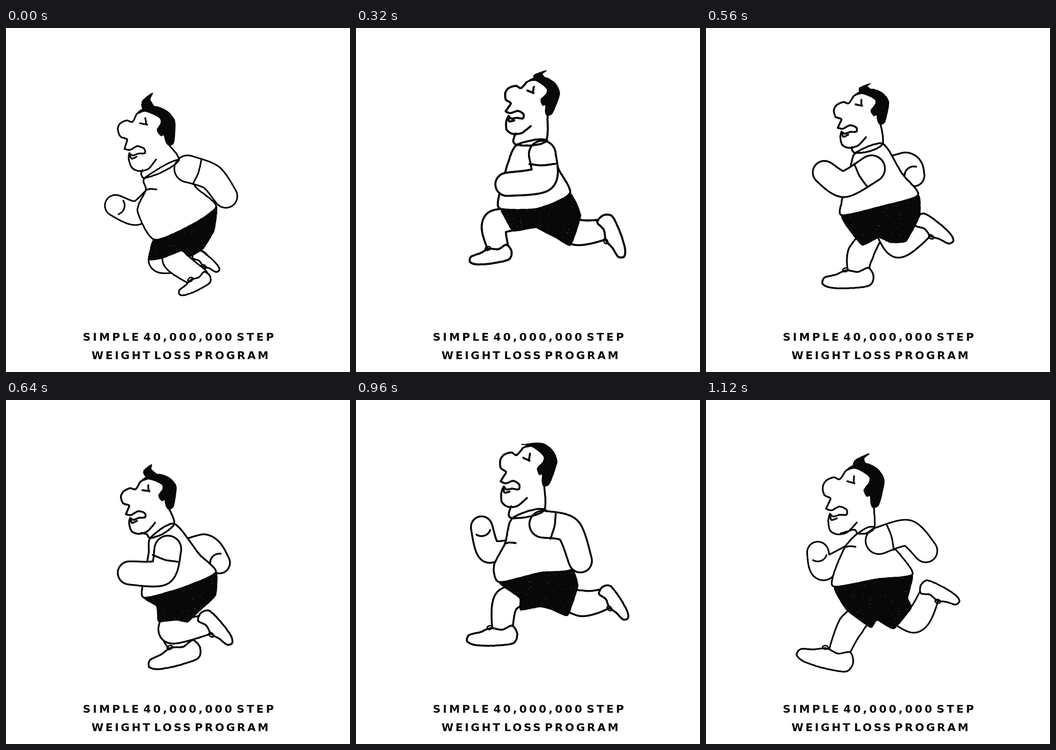
An HTML page with a canvas that plays this animation: 748 px wide and 748 px high, repeating every 1200 ms.

```html
<!DOCTYPE html>
<html lang="en">
<head>
<meta charset="utf-8">
<title>Runner</title>
<style>
html, body { margin: 0; width: 100%; height: 100%; overflow: hidden; background: #fff; }
canvas, svg { position: absolute; left: 0; top: 0; width: 748px; height: 748px; }
text { font: bold 23.5px "DejaVu Sans", sans-serif; fill: #080808; word-spacing: -8px; }
</style>
</head>
<body>
<canvas id="stage" width="748" height="748"></canvas>
<svg viewBox="0 0 748 748">
  <text x="167" y="680" letter-spacing="4.9">SIMPLE 40,000,000 STEP</text>
  <text x="186" y="720" letter-spacing="4.3">WEIGHT LOSS PROGRAM</text>
</svg>
<script>
const STEP = 80, STEPS = 15, POSES = 7;
const INK = '#080808', PAPER = '#fff';

// Each track has one row of x, y pairs per key pose.
// Nose tip, back of the head, chin, tip of the hair.
const head = [
  [243, 220, 366, 215, 290, 311, 318, 142],
  [325, 140, 438, 155, 340, 230, 413, 93],
  [310, 145, 425, 146, 334, 230, 398, 101],
  [250, 210, 368, 200, 288, 291, 316, 141],
  [274, 198, 389, 195, 290, 290, 315, 142],
  [314, 130, 432, 148, 330, 232, 366, 97],
  [254, 188, 384, 190, 285, 292, 354, 117]
];
// Collar, chest, belly, waist front to back, back, nape.
const torso = [
  [302, 326, 304, 352, 286, 398, 322, 460, 400, 430, 457, 388, 412, 345, 376, 287],
  [350, 254, 330, 295, 309, 375, 318, 394, 395, 393, 465, 360, 440, 306, 414, 244],
  [338, 246, 318, 285, 296, 350, 293, 385, 385, 371, 467, 354, 435, 298, 404, 236],
  [314, 300, 310, 335, 297, 402, 302, 430, 385, 408, 456, 375, 420, 335, 366, 269],
  [318, 318, 322, 348, 303, 385, 306, 426, 400, 424, 466, 392, 450, 342, 374, 280],
  [340, 257, 324, 312, 300, 360, 312, 396, 400, 376, 469, 368, 459, 310, 410, 238],
  [330, 290, 302, 320, 277, 380, 280, 406, 370, 390, 448, 380, 425, 340, 366, 277]
];
// Seat, rear hem, crotch, front hem.
const hem = [
  [452, 440, 428, 480, 398, 497, 382, 484, 340, 500, 311, 503],
  [488, 408, 466, 472, 430, 452, 395, 433, 342, 441, 322, 408],
  [476, 396, 456, 466, 410, 450, 385, 432, 350, 460, 298, 425],
  [455, 425, 416, 462, 395, 482, 370, 478, 332, 481, 328, 448],
  [470, 464, 430, 474, 402, 480, 398, 474, 360, 476, 338, 445],
  [482, 404, 460, 468, 425, 455, 400, 449, 358, 456, 356, 430],
  [438, 430, 446, 452, 408, 497, 372, 478, 358, 494, 306, 456]
];
// Knee, ankle, toe.
const farLeg = [
  [338, 504, 420, 505, 462, 528], [304, 424, 310, 482, 248, 505],
  [312, 465, 288, 520, 212, 524], [368, 510, 386, 538, 311, 576],
  [448, 490, 484, 518, 426, 560], [490, 442, 544, 432, 588, 476],
  [452, 478, 487, 422, 549, 440]
];
const nearLeg = [
  [368, 502, 420, 543, 377, 577], [480, 444, 540, 438, 579, 498],
  [474, 440, 513, 388, 573, 413], [360, 501, 436, 489, 489, 530],
  [334, 480, 396, 508, 399, 570], [328, 436, 318, 501, 242, 520],
  [316, 490, 287, 553, 199, 550]
];
// Shoulder, elbow, hand.
const nearArm = [
  [395, 306, 446, 324, 478, 366], [405, 274, 406, 328, 328, 340],
  [375, 286, 284, 306, 264, 262], [352, 324, 338, 375, 268, 376],
  [390, 318, 434, 370, 380, 398], [406, 270, 462, 282, 488, 350],
  [376, 306, 438, 289, 478, 328]
];
// Elbow, hand.
const farArm = [
  [284, 402, 238, 386], [370, 325, 385, 350], [426, 284, 428, 296],
  [430, 318, 464, 354], [375, 365, 390, 380], [290, 328, 273, 276],
  [256, 366, 243, 331]
];
const weight = [[3.5], [4.4], [3.9], [3.9], [4], [4.1], [3.6]];
const pec = [[1], [0], [0], [0], [0.6], [1], [1]];

// Head lines, drawn in the first pose and carried to the others.
const hair = [299, 175, 284, 187, 301, 181, 320, 187, 335, 196, 337, 207, 329, 222, 337, 234,
  343, 232, 348, 247, 354, 255, 364, 250, 367, 225, 366, 200, 350, 181, 326, 171];
const face = [284, 187, 275, 204, 262, 201, 248, 208, 243, 220, 249, 236, 263, 242, 261, 252, 258, 262];
const mouth = [258, 263, 270, 265, 285, 257, 300, 262, 302, 272, 288, 273, 276, 277, 268, 272];
const chin = [284, 280, 273, 284, 268, 273, 267, 286, 274, 304, 290, 311, 310, 306, 326, 286];
const eye = [291, 207, 306, 210, 305, 209, 303, 196];
const neckEnds = [297, 309, 356, 256];
const tuftBase = [299, 177, 322, 174];
// Shoe outline: along and above the line from ankle to toe.
const shoe = [0.3, 0.14, 0.6, 0.1, 0.92, 0.1, 1.02, -0.05, 0.85, -0.2, 0.4, -0.34,
  -0.2, -0.42, -0.38, -0.2, -0.3, 0.06, 0, 0.02];

const ctx = document.getElementById('stage').getContext('2d');
ctx.lineCap = ctx.lineJoin = 'round';
let rnd, line;

function random(seed) {
  return () => {
    seed = (seed * 1664525 + 1013904223) >>> 0;
    return seed / 4294967296;
  };
}

const pairs = v => v.filter((_, i) => i % 2 === 0).map((x, i) => [x, v[2 * i + 1]]);
const add = (p, x, y) => [p[0] + x, p[1] + y];
const mix = (p, q, t) => [p[0] + (q[0] - p[0]) * t, p[1] + (q[1] - p[1]) * t];

function hermite(a, b, c, d, t, k) {
  const m = (c - a) * k, n = (d - b) * k, s = t * t, u = s * t;
  return b * (2 * u - 3 * s + 1) + m * (u - 2 * s + t) + c * (3 * s - 2 * u) + n * (u - s);
}

// Smooth curve through the points.
function curve(pts, closed, k = 0.42) {
  const n = pts.length, out = [];
  const at = i => pts[closed ? (i + n) % n : Math.max(0, Math.min(n - 1, i))];
  const segs = closed ? n : n - 1;
  for (let i = 0; i < segs; i++)
    for (let j = 0; j < 20; j++)
      out.push([0, 1].map(a =>
        hermite(at(i - 1)[a], at(i)[a], at(i + 1)[a], at(i + 2)[a], j / 20, k)));
  out.push(at(segs));
  return out;
}

function trace(pts, { fill, closed, k, width = line } = {}) {
  ctx.beginPath();
  for (const p of curve(pts, closed, k))
    ctx.lineTo(p[0] + (rnd() - 0.5) * 0.7, p[1] + (rnd() - 0.5) * 0.7);
  if (closed) ctx.closePath();
  if (fill) {
    ctx.fillStyle = fill;
    ctx.fill();
  }
  ctx.lineWidth = width;
  ctx.stroke();
}

// A bent tube through three joints with a radius at each.
function limb(joints, radii) {
  const path = curve(joints, false);
  for (const [color, grow] of [[INK, line / 2], [PAPER, -line / 2]]) {
    ctx.fillStyle = color;
    path.forEach((p, i) => {
      const s = i / 20, j = Math.min(1, Math.floor(s));
      const r = radii[j] + (radii[j + 1] - radii[j]) * (s - j);
      ctx.beginPath();
      ctx.arc(p[0], p[1], r + grow, 0, 7);
      ctx.fill();
    });
  }
}

function leg(hip, [knee, ankle, toe]) {
  limb([hip, knee, ankle], [18, 28, 21]);
  const dx = toe[0] - ankle[0], dy = toe[1] - ankle[1];
  const place = ([u, v]) => add(ankle, u * dx - v * dy, u * dy + v * dx);
  trace(pairs(shoe).map(place), { fill: PAPER, closed: true });
  const knot = place([0.32, 0.16]);
  ctx.beginPath();
  ctx.ellipse(knot[0], knot[1], 6, 4, Math.atan2(dy, dx), 0, 7);
  ctx.lineWidth = 3;
  ctx.stroke();
}

function drawFarArm(chest, [elbow, hand]) {
  limb([add(chest, 14, 4), elbow, hand], [10, 26, 23]);
  const aim = Math.atan2(elbow[1] - hand[1], elbow[0] - hand[0]);
  ctx.beginPath();
  ctx.arc(hand[0], hand[1], 20, aim - 0.9, aim + 0.9);
  ctx.lineWidth = line;
  ctx.stroke();
}

function drawNearArm([shoulder, elbow, hand]) {
  limb([shoulder, elbow, hand], [29, 28, 25]);
  const c = mix(shoulder, elbow, 0.4);
  const dx = elbow[0] - shoulder[0], dy = elbow[1] - shoulder[1];
  const f = 28 / Math.hypot(dx, dy);
  trace([add(c, -dy * f, dx * f), add(c, dx * f / 9, dy * f / 9), add(c, dy * f, -dx * f)]);
}

function drawShorts(pts) {
  trace(pts, { fill: INK, closed: true, k: 0.2, width: 3 });
  ctx.save();
  ctx.clip();
  ctx.fillStyle = 'rgba(255,255,255,.5)';
  const [x, y] = pts[1];
  for (let i = 0; i < 90; i++) {
    const r = 0.6 + rnd() * 0.8;
    ctx.fillRect(x + (rnd() - 0.5) * 210, y + (rnd() - 0.3) * 130, r, r);
  }
  ctx.restore();
}

function drawHead([nose, back, jaw, tip], collar, nape) {
  const [n0, b0, j0] = pairs(head[0]);
  const bx = b0[0] - n0[0], by = b0[1] - n0[1], jx = j0[0] - n0[0], jy = j0[1] - n0[1];
  const det = bx * jy - by * jx;
  const carry = v => pairs(v).map(([x, y]) => {
    const px = x - n0[0], py = y - n0[1];
    const u = (px * jy - py * jx) / det, w = (bx * py - by * px) / det;
    return [0, 1].map(a => nose[a] + u * (back[a] - nose[a]) + w * (jaw[a] - nose[a]));
  });
  const [front, rear] = carry(neckEnds);
  trace([front, add(collar, -8, -8), collar, add(mix(collar, nape, 0.5), 2, 6), nape, rear]);
  for (const v of [chin, face, mouth, eye]) trace(carry(v));
  const [left, right] = carry(tuftBase);
  trace([left, add(mix(left, tip, 0.5), -12, 0), tip, add(mix(right, tip, 0.5), -7, -2), right],
    { fill: INK, closed: true, width: 2 });
  trace(carry(hair), { fill: INK, closed: true, width: 2 });
}

function draw(step) {
  // The first pose holds for two steps, then takes three to the next.
  const u = step < 2 ? 0 : step < 4 ? (step - 1) / 3 : step / 2 - 1;
  const i = Math.floor(u), t = u - i;
  const values = track => {
    const [a, b, c, d] = [-1, 0, 1, 2].map(o => track[(i + o + POSES) % POSES]);
    return b.map((v, j) => hermite(a[j], v, c[j], d[j], t, 0.4));
  };
  const points = track => pairs(values(track));

  rnd = random(step * 97 + 5);
  line = values(weight)[0];
  ctx.fillStyle = PAPER;
  ctx.fillRect(0, 0, 748, 748);
  ctx.strokeStyle = INK;

  const body = points(torso), edge = points(hem);
  const [collar, chest, , w1, w2, w3, , nape] = body;
  const hip = mix(w2, edge[3], 0.5);

  drawFarArm(chest, points(farArm));
  leg(hip, points(farLeg));
  leg(hip, points(nearLeg));
  drawShorts([w1, w2, w3, ...edge]);
  trace(body, { fill: PAPER, closed: true, k: 0.36 });
  const fold = values(pec)[0];
  if (fold > 0.3) trace([chest, add(chest, 10 * fold, -2), add(chest, 23 * fold, -1)]);
  drawNearArm(points(nearArm));
  drawHead(points(head), collar, nape);
}

const start = performance.now();
let shown = -1;
function tick() {
  const step = Math.floor((performance.now() - start) / STEP) % STEPS;
  if (step !== shown) draw(shown = step);
  requestAnimationFrame(tick);
}
tick();
</script>
</body>
</html>
```
